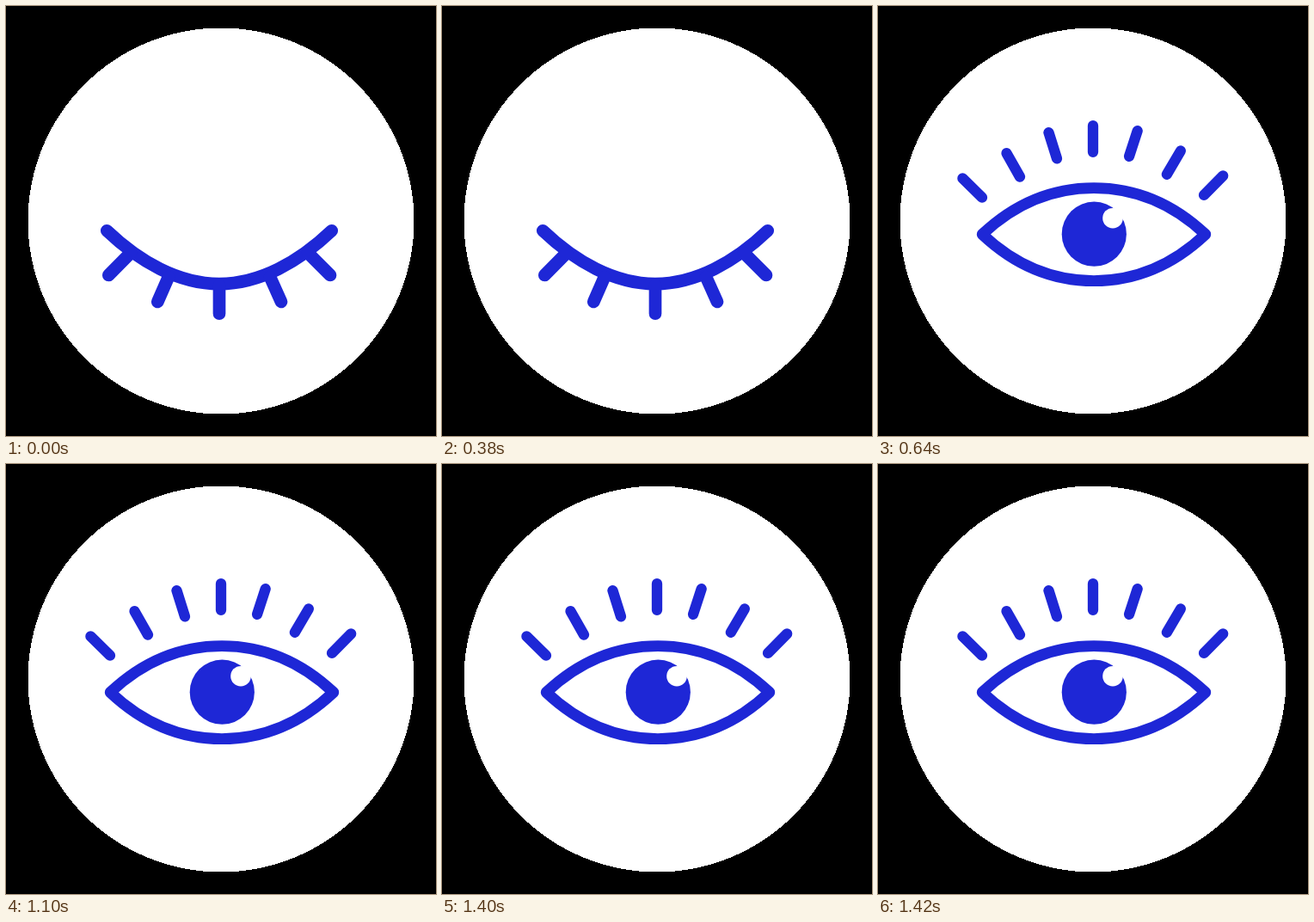
An HTML page that plays this animation: 500x500 px, repeating every 1.44 s.

```html
<!DOCTYPE html>
<html lang="en">
<head>
<meta charset="utf-8">
<title>Blinking eye</title>
<style>
  html, body { margin: 0; height: 100%; overflow: hidden; background: #000; }
  svg { display: block; width: 100%; height: 100%; }
  .pose { fill: none; stroke: #1e27d6; stroke-linecap: round; stroke-linejoin: round; }
</style>
</head>
<body>
<svg viewBox="0 0 500 500">
  <circle cx="250" cy="250" r="224.5" fill="#fff" shape-rendering="crispEdges"/>

  <g id="closed" class="pose" stroke-width="14.7">
    <path d="M117.3 261.3C155.5 297.8 201 323 248 323S340.5 297.8 378.7 261.3"/>
    <path d="M145 287L119.3 313M189 315L176.3 344M248 325V357.7M307 315L320 344M351 287L377 313"/>
  </g>

  <g id="open" class="pose" stroke-width="12.8" visibility="hidden">
    <path d="M121.2 265.5C162 227 205 211.6 251 211.6S340 227 380.8 265.5C340 304 297 319.6 251 319.6S162 304 121.2 265.5Z"/>
    <path stroke-width="12.3" d="M98.4 200.4L121 222.7M149.5 171.2L165 198.6M198.5 147.2L208 177.3M250 139.2V169.8M301.7 145.2L292 174.8M351.9 168.5L335.8 195.8M401.2 197.4L379 219.9"/>
    <circle cx="251.3" cy="265.2" r="37.6" fill="#1e27d6" stroke="none"/>
    <circle cx="273" cy="246.7" r="11.8" fill="#fff" stroke="none"/>
  </g>
</svg>
<script>
  const LOOP = 1440, OPEN_AT = 640;
  const closed = document.getElementById('closed');
  const open = document.getElementById('open');
  const start = performance.now();

  const show = (el, on) => el.setAttribute('visibility', on ? 'visible' : 'hidden');

  function draw() {
    const isOpen = (performance.now() - start) % LOOP >= OPEN_AT;
    show(open, isOpen);
    show(closed, !isOpen);
    requestAnimationFrame(draw);
  }
  draw();
</script>
</body>
</html>
```
